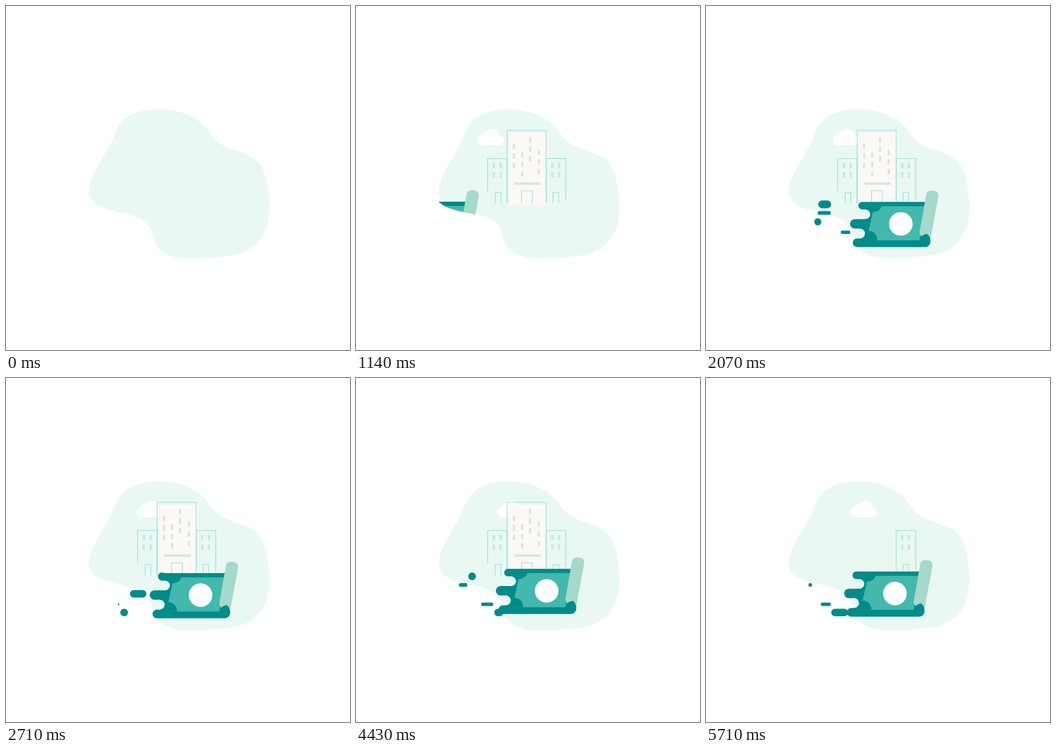
Recreate the animation shown at these times as an HTML page. Size 640 px wide and 640 px high, loop 5780 ms.

```html
<!DOCTYPE html>
<html lang="en">
<head>
<meta charset="utf-8">
<title>Banknote and buildings</title>
<style>
  html, body { margin: 0; height: 100%; overflow: hidden; background: #fff; }
  svg { display: block; width: 100%; height: 100%; }
  .line { fill: none; stroke: #8adbce; stroke-width: 1.1; }
  .line path { vector-effect: non-scaling-stroke; }
  .pane { fill: #c5eae2; }
  .tower { fill: #d5e9e1; }
  .dark { fill: #008c89; }
</style>
</head>
<body>
<svg viewBox="0 0 640 640">
  <defs>
    <path id="blob" d="M286 192C326 192 362 210 378 234C391 253 400 260 428 269C466 280 477 294 483 320C488 342 490 360 490 376C490 425 465 457 420 464C395 467 365 470 343 470C300 470 277 455 272 425C268 402 248 392 216 385C185 378 154 372 154 344C156 315 182 282 198 250C206 222 222 192 286 192Z"/>
    <clipPath id="entry"><use href="#blob" x="-8"/></clipPath>
  </defs>
  <use href="#blob" fill="#e9f8f3"/>

  <g id="cloud" fill="#fff">
    <circle cx="9.5" cy="249.5" r="9.5"/>
    <circle cx="15" cy="243" r="8.6"/>
    <circle cx="27" cy="241.7" r="13.2"/>
    <circle cx="39.5" cy="250.3" r="8.7"/>
    <path d="M9 242H39V259H9Z"/>
  </g>

  <g id="left">
    <g class="line"><path d="M244.8 344V283.8H281V367M259 367V347H269.5V367"/></g>
    <g class="pane"></g>
  </g>
  <g id="main">
    <path fill="#fcf8f6" d="M285 235.5H358V370H285Z"/>
    <g class="line"><path d="M281.2 367V231.2H353.8V367M308 367V343.7H328V367"/></g>
    <g class="tower"><path d="M294 328H343.5V332.7H294Z"/></g>
  </g>
  <g id="right">
    <g class="line"><path d="M353.8 367V283.8H390.2V361M366.5 367V347H377V367"/></g>
    <g class="pane"></g>
  </g>

  <g id="trails" stroke="#008c89" stroke-linecap="round"></g>

  <g id="mask"><g id="bill">
    <path class="dark" d="M-72 -41H50L38 43H-81.5A8 8 0 0 1 -81.5 27H-76A9.2 9.2 0 0 0 -76 8.6H-85.7A8.8 8.8 0 0 1 -85.7 -9H-66A9 9 0 0 0 -66 -27H-72A7 7 0 0 1 -72 -41Z"/>
    <path fill="#43b8ac" d="M-49.7 -33H46L35 30.5H-64Z"/>
    <path class="dark" d="M-36 -33A17 13 0 0 1 -53 -22L-56 -33ZM-60.5 13A16 16 0 0 1 -44 30.5H-66Z"/>
    <circle r="22" fill="#fff"/>
    <path fill="#a5d9cc" d="M47 -54C48 -60 53 -63 59 -62C66 -62 70.5 -58 70 -52L54.5 31L40 26L34.5 17Z"/>
    <path class="dark" d="M34 31C37 23 41 19.5 49 18.5C53 22 55 26 55 33C55 39 50 43 45 43H34Z"/>
  </g></g>
</svg>
<script>
const LOOP = 5780, GROUND = 367, TRAIL_PERIOD = 1105, TRAIL_ORIGIN = 395;
const $ = id => document.getElementById(id);
const clamp = p => Math.min(1, Math.max(0, p));
const ease = p => (1 - Math.cos(Math.PI * clamp(p))) / 2;

function add(parent, tag, attrs) {
  const node = document.createElementNS('http://www.w3.org/2000/svg', tag);
  for (const key in attrs) node.setAttribute(key, attrs[key]);
  return parent.appendChild(node);
}

function addWindows(group, x, ys) {
  for (const y of ys) add(group, 'rect', { x, y, width: 4.2, height: 10 });
}
for (const [id, x] of [['left', 254.4], ['right', 363]])
  for (const dx of [0, 12.6]) addWindows($(id).querySelector('.pane'), x + dx, [292, 309.6]);
[[291.8, 256.4], [307.1, 272], [321.9, 243.6], [338, 267.4]].forEach(([x, y]) =>
  addWindows($('main').querySelector('.tower'), x, [y, y + 17.8, y + 35.6]));

// Smooth curve through [time, value] keys.
function curve(keys, t) {
  const last = keys.length - 1;
  if (t <= keys[0][0]) return keys[0][1];
  if (t >= keys[last][0]) return keys[last][1];
  const i = keys.findIndex(k => k[0] > t) - 1;
  const slope = j => {
    const a = keys[Math.max(0, j - 1)], b = keys[Math.min(last, j + 1)];
    return (b[1] - a[1]) / (b[0] - a[0]);
  };
  const [t0, v0] = keys[i], [t1, v1] = keys[i + 1], d = t1 - t0, p = (t - t0) / d;
  return v0 + (v1 - v0) * p * p * (3 - 2 * p)
    + d * p * (1 - p) * (slope(i) * (1 - p) - slope(i + 1) * p);
}

const cloudX = [[290, 221], [710, 223], [1500, 229.7], [2710, 243], [3500, 253], [4430, 262.5], [5710, 269]];
const billX = [[1000, 60], [1250, 230], [1500, 352.5], [1800, 363.5], [2300, 360.5], [2710, 362],
  [2950, 363], [3500, 359.7], [4430, 354.7], [4750, 355.5], [5230, 359], [5710, 351.5]];
const billY = [[1500, 405], [1850, 407], [2250, 404], [2710, 404], [2900, 404.5], [3500, 400],
  [4430, 396], [4700, 395], [5200, 402], [5710, 401]];

const buildings = [
  { id: 'left', start: 510, end: 5570 },
  { id: 'main', start: 610, end: 5640 },
  { id: 'right', start: 710, end: LOOP }
];

// head and tail: [start, duration] within the trail period
const trails = [
  { y: 369, r: 7.2, from: 290, to: 216, head: [100, 450], tail: [180, 510], fade: 740 },
  { y: 385, r: 3.4, from: 260, to: 194, head: [200, 560], tail: [300, 560], fade: 900 },
  { y: 421, r: 3.3, from: 267, to: 209.5, head: [345, 715], tail: [496, 660], fade: 1156 },
  { y: 436.2, r: 7, from: 267, to: 219.7, head: [650, 450], tail: [750, 480], fade: 1230 },
  { y: 401.5, r: 7, from: 270, to: 208, head: [830, 740], tail: [980, 680], fade: 1670 }
];
for (const trail of trails)
  trail.nodes = [0, 1].map(() => add($('trails'), 'line', { y1: trail.y, y2: trail.y }));

function grow(age) {
  const peak = 1.11;
  return age < 250 ? peak * Math.sin(Math.PI / 2 * age / 250) : peak + (1 - peak) * ease((age - 250) / 200);
}

function drawTrail(trail, t) {
  const cycle = Math.floor((t - TRAIL_ORIGIN) / TRAIL_PERIOD);
  trail.nodes.forEach((node, k) => {
    const origin = TRAIL_ORIGIN + (cycle - k) * TRAIL_PERIOD, age = t - origin;
    const at = ([start, duration]) => trail.from + (trail.to - trail.from) * ease((age - start) / duration);
    const size = 1 - clamp((age - trail.fade) / 100);
    const visible = origin + trail.head[0] >= 1200 && age > trail.head[0] && size > 0;
    node.style.display = visible ? '' : 'none';
    node.setAttribute('x1', at(trail.head));
    node.setAttribute('x2', at(trail.tail) + 0.01);
    node.setAttribute('stroke-width', 2 * trail.r * size);
  });
}

function draw(now) {
  const t = now % LOOP;
  $('cloud').setAttribute('transform', `translate(${curve(cloudX, t)} 0)`);
  $('cloud').style.opacity = clamp((t - 290) / 280);
  for (const { id, start, end } of buildings) {
    const visible = t > start && t < end;
    $(id).style.display = visible ? '' : 'none';
    if (visible) $(id).setAttribute('transform', `translate(0 ${GROUND}) scale(1 ${grow(t - start)}) translate(0 ${-GROUND})`);
  }
  for (const trail of trails) drawTrail(trail, t);
  $('mask').style.display = t < 1000 ? 'none' : '';
  $('mask').setAttribute('clip-path', t < 1570 ? 'url(#entry)' : 'none');
  $('bill').setAttribute('transform', `translate(${curve(billX, t)} ${curve(billY, t)})`);
}

let begin;
function tick(now) {
  begin ??= now;
  draw(now - begin);
  requestAnimationFrame(tick);
}
draw(0);
requestAnimationFrame(tick);
</script>
</body>
</html>
```
